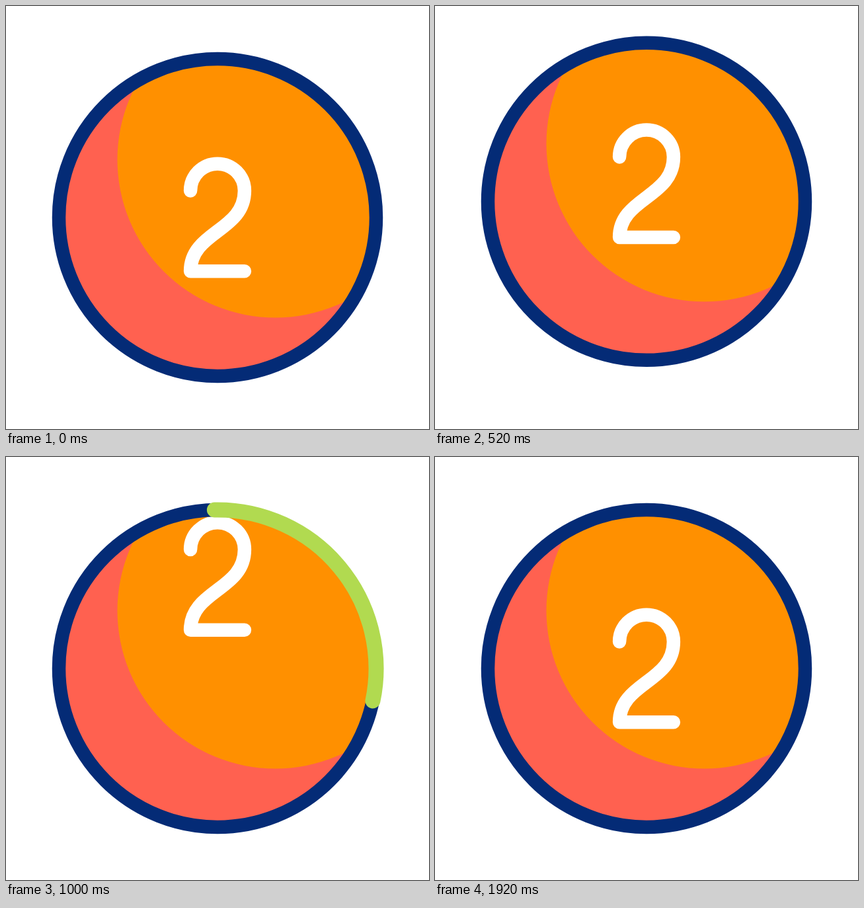
Recreate the animation shown at these times as an HTML page. Size 640x640 px, loop 2000 ms.

```html
<!DOCTYPE html>
<html lang="en">
<head>
<meta charset="utf-8">
<title>Bouncing two</title>
<style>
html, body { margin: 0; width: 100%; height: 100%; overflow: hidden; background: #fff; }
svg { display: block; width: 100vw; height: 100vh; }
</style>
</head>
<body>
<svg viewBox="0 0 640 640" fill="none" stroke-linecap="round" stroke-linejoin="round">
  <clipPath id="disc"><circle cx="320" cy="320" r="240"/></clipPath>
  <g id="ball">
    <circle cx="320" cy="320" r="240" fill="#ff6150"/>
    <circle cx="407.5" cy="232.5" r="239" fill="#ff9000" clip-path="url(#disc)"/>
  </g>
  <path id="digit" stroke="#fff" stroke-width="20.5"
    d="M279.1 279.5A40.9 40.9 0 0 1 360.9 279.5C360.9 341 279.1 341 279.1 401.2H360.9"/>
  <circle id="ring" cx="320" cy="320" r="240" stroke="#042b76" stroke-width="20.5"/>
  <path id="arc" stroke="#b1da50" stroke-width="23"/>
</svg>
<script>
const LOOP = 2000, STEP = 40;
const [ball, digit, ring, arc] = ["ball", "digit", "ring", "arc"].map(id => document.getElementById(id));

// keys: [time, value] pairs, eased in and out between neighbours
const ballKeys = [[120, 0], [360, 33.3], [560, -30.8], [760, 0]];
const digitKeys = [[120, 0], [360, 51.2], [560, -63], [760, 52.8], [1000, -139.5], [1240, 0]];
const headKeys = [[760, 0], [1440, 360]];
const tailKeys = [[1000, 0], [1915, 360]];
const ARC_ORIGIN = -1.1;

function valueAt(keys, t) {
  if (t <= keys[0][0]) return keys[0][1];
  for (let i = 1; i < keys.length; i++) {
    const [t0, a] = keys[i - 1], [t1, b] = keys[i];
    if (t < t1) {
      const u = (t - t0) / (t1 - t0);
      return a + (b - a) * u * u * (3 - 2 * u);
    }
  }
  return keys[keys.length - 1][1];
}

function rimPoint(deg) {
  const a = (deg + ARC_ORIGIN) * Math.PI / 180;
  return `${320 + 240 * Math.sin(a)} ${320 - 240 * Math.cos(a)}`;
}

function arcPath(tail, head) {
  if (head - tail < 0.01) return "";
  const mid = (tail + head) / 2;
  return `M${rimPoint(tail)}A240 240 0 0 1 ${rimPoint(mid)}A240 240 0 0 1 ${rimPoint(head)}`;
}

const shift = (el, y) => el.setAttribute("transform", `translate(0 ${y})`);

function draw(t) {
  const y = valueAt(ballKeys, t);
  shift(ball, y);
  shift(ring, y);
  shift(digit, valueAt(digitKeys, t));
  arc.setAttribute("d", arcPath(valueAt(tailKeys, t), valueAt(headKeys, t)));
}

let start;
function tick(now) {
  start ??= now;
  draw(Math.floor((now - start) % LOOP / STEP) * STEP);
  requestAnimationFrame(tick);
}
draw(0);
requestAnimationFrame(tick);
</script>
</body>
</html>
```
